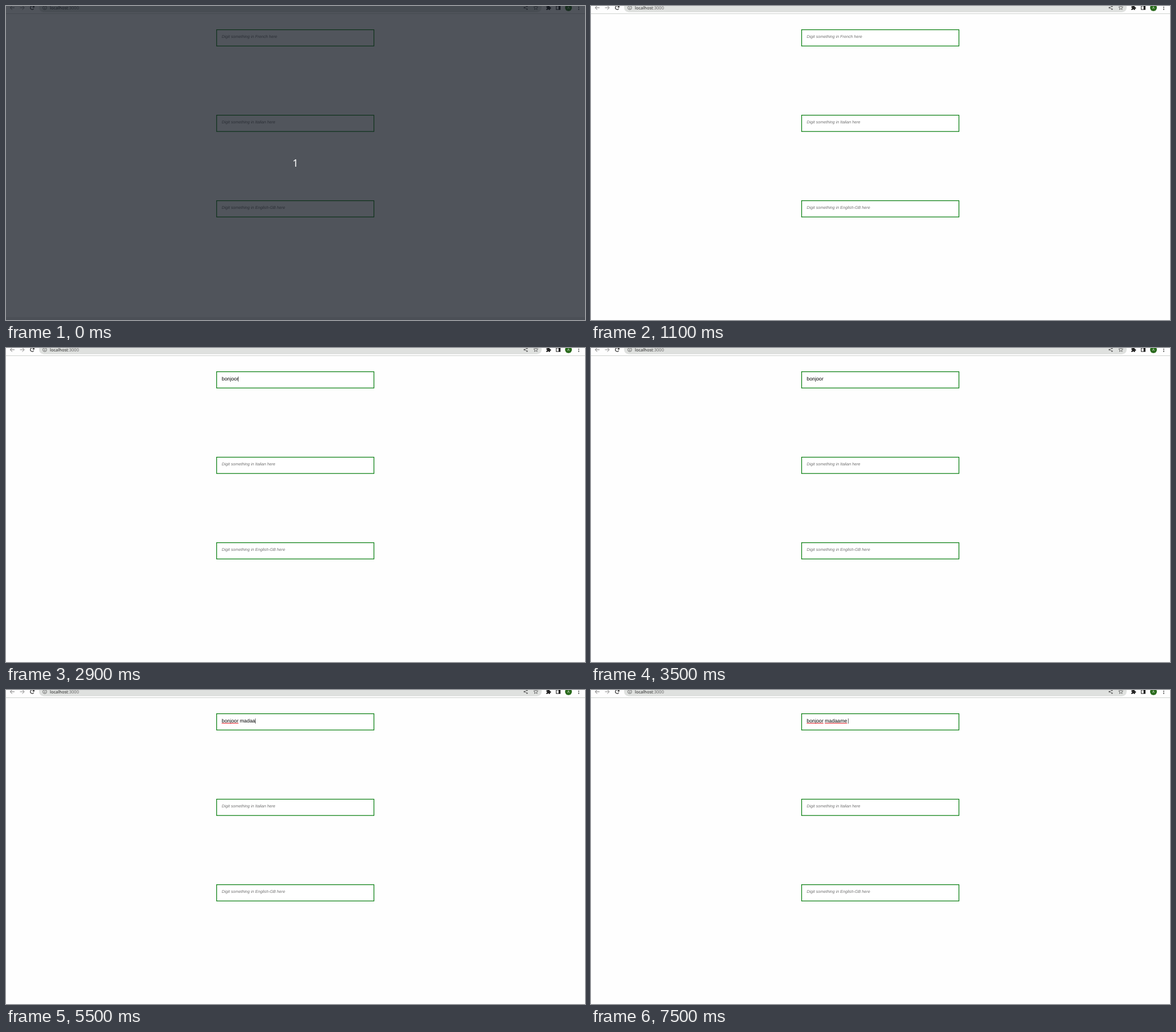
An HTML page with a canvas that plays this animation: 1016 by 551 pixels, repeating every 8000 ms.

```html
<!DOCTYPE html>
<html lang="en">
<head>
<meta charset="utf-8">
<title>Spell check demo</title>
<style>
  html, body { margin: 0; width: 100%; height: 100%; overflow: hidden; background: #fefefe; }
  canvas { display: block; width: 1016px; height: 551px; }
</style>
</head>
<body>
<canvas id="stage" width="1016" height="551"></canvas>
<script>
const ctx = document.getElementById('stage').getContext('2d');
const W = 1016, H = 551, LOOP = 8000, TAU = Math.PI * 2;
const SANS = '"Liberation Sans", Arial, sans-serif';
const UI = '"Noto Sans", "Open Sans", sans-serif';
const INPUT_FONT = '8.8px ' + SANS;
const HINT_FONT = 'italic 7.15px ' + SANS;
const TEXT_X = 378.5;

const PHRASE = 'bonjoor madaame ';
// time of each keystroke in ms
const KEYS = [1500, 1600, 1900, 2000, 2500, 2700, 2900, 3900,
              4300, 4400, 4800, 5100, 5500, 5900, 6100, 6300];
const FOCUS = 500, BLINK = 600, CHECK_DELAY = 500;

function text(str, x, y, font, color, align = 'left') {
  ctx.font = font;
  ctx.fillStyle = color;
  ctx.textAlign = align;
  ctx.fillText(str, x, y);
}

function line(points, color, width = 1) {
  ctx.beginPath();
  points.forEach(([x, y]) => ctx.lineTo(x, y));
  ctx.strokeStyle = color;
  ctx.lineWidth = width;
  ctx.stroke();
}

function disc(x, y, r, color) {
  ctx.beginPath();
  ctx.arc(x, y, r, 0, TAU);
  ctx.fillStyle = color;
  ctx.fill();
}

function rect(x, y, w, h, color) {
  ctx.fillStyle = color;
  ctx.fillRect(x, y, w, h);
}

function arrow(x, dir, color) {
  line([[x - 4 * dir, 3], [x + 3.6 * dir, 3]], color);
  line([[x, -0.6], [x + 3.7 * dir, 3], [x, 6.6]], color);
}

function reload(x, y) {
  ctx.beginPath();
  ctx.arc(x, y, 3.2, 0.5, TAU - 0.75);
  ctx.strokeStyle = '#333';
  ctx.lineWidth = 1.2;
  ctx.stroke();
  ctx.beginPath();
  ctx.moveTo(x + 3.9, y - 4);
  ctx.lineTo(x + 3.9, y - 0.3);
  ctx.lineTo(x + 0.3, y - 0.3);
  ctx.fillStyle = '#333';
  ctx.fill();
}

function info(x, y) {
  ctx.beginPath();
  ctx.arc(x, y, 3.4, 0, TAU);
  ctx.strokeStyle = '#555';
  ctx.lineWidth = 0.8;
  ctx.stroke();
  rect(x - 0.45, y - 0.4, 0.9, 2.4, '#444');
  rect(x - 0.45, y - 2, 0.9, 0.9, '#444');
}

function share(x, y) {
  line([[x + 2.3, y - 2.6], [x - 2.4, y], [x + 2.3, y + 2.6]], '#555', 0.8);
  [[2.3, -2.6], [-2.4, 0], [2.3, 2.6]].forEach(([dx, dy]) => disc(x + dx, y + dy, 1.2, '#555'));
}

function star(x, y) {
  ctx.beginPath();
  for (let i = 0; i < 10; i++) {
    const r = i % 2 ? 1.8 : 4, a = i * TAU / 10 - TAU / 4;
    ctx.lineTo(x + r * Math.cos(a), y + r * Math.sin(a));
  }
  ctx.closePath();
  ctx.strokeStyle = '#555';
  ctx.lineWidth = 0.8;
  ctx.stroke();
}

function puzzle(x, y) {
  rect(x - 3.8, y - 2.4, 6.4, 6.4, '#222');
  disc(x - 0.5, y - 2.8, 1.4, '#222');
  disc(x + 3, y + 0.6, 1.4, '#222');
  disc(x - 3.6, y + 0.8, 1.1, '#fefefe');
  disc(x - 0.5, y + 3.9, 1.1, '#fefefe');
}

function panel(x, y) {
  ctx.strokeStyle = '#222';
  ctx.lineWidth = 1;
  ctx.strokeRect(x - 3.5, y - 3, 7, 6.2);
  rect(x + 0.6, y - 3, 3, 6.2, '#222');
}

function toolbar() {
  ctx.beginPath();
  ctx.roundRect(58, -6, 882, 17, 8.5);
  ctx.fillStyle = '#dfe1df';
  ctx.fill();
  rect(0, 13, W, 1, '#d0d2d0');

  arrow(11, -1, '#777');
  arrow(28.5, 1, '#888');
  reload(46, 3);
  info(68, 3);

  const font = '7.52px ' + UI, host = 'localhost';
  text(host, 77, 6, font, '#222');
  text(':3000', 77 + ctx.measureText(host).width, 6, font, '#666');

  share(912, 3);
  star(929.7, 3);
  puzzle(952, 3);
  panel(969, 3);
  disc(987, 3, 6, '#2b6b1e');
  text('A', 987, 5, '6px ' + UI, '#e8f0e6', 'center');
  [-0.2, 2.9, 6].forEach(y => disc(1005, y, 0.9, '#333'));
}

function field(y, hint) {
  rect(369, y, 277, 29.6, '#fff');
  ctx.strokeStyle = '#0a7f12';
  ctx.lineWidth = 1.25;
  ctx.strokeRect(369.6, y + 0.6, 276, 28.6);
  if (hint) text(`Digit something in ${hint} here`, TEXT_X, y + 15, HINT_FONT, '#707070');
}

function squiggle(from, to) {
  rect(from, 58, to - from, 1, 'rgba(226,28,36,0.85)');
  rect(from, 57, to - from, 1, 'rgba(226,28,36,0.15)');
}

function typing(t) {
  const count = KEYS.filter(k => k <= t).length;
  const typed = PHRASE.slice(0, count);
  text(typed, TEXT_X, 57, INPUT_FONT, '#000');
  const xAt = n => TEXT_X + ctx.measureText(PHRASE.slice(0, n)).width;

  // a finished word is checked shortly after the space that follows it
  let start = 0;
  for (let i = 0; i < PHRASE.length; i++) {
    if (PHRASE[i] !== ' ') continue;
    if (t >= KEYS[i] + CHECK_DELAY) squiggle(xAt(start), xAt(i));
    start = i + 1;
  }

  if (t < FOCUS) return;
  const since = t - (count ? KEYS[count - 1] : FOCUS);
  if (Math.floor(since / BLINK) % 2 === 0) {
    rect(Math.floor(xAt(count)), 50, 1, 9, 'rgba(0,0,0,0.6)');
  }
}

function countdown() {
  rect(0, 0, W, H, 'rgba(17,22,32,0.73)');
  rect(0, 546, W, 5, 'rgba(40,44,52,0.12)');
  text('1', 507.8, 282, '500 18px ' + UI, '#fff', 'center');
}

function draw(t) {
  ctx.textRendering = 'geometricPrecision';
  rect(0, 0, W, H, '#fefefe');
  toolbar();
  field(41, t < KEYS[0] ? 'French' : '');
  field(191, 'Italian');
  field(341, 'English-GB');
  typing(t);
  if (t < 100) countdown();
}

const begin = performance.now();
function tick() {
  draw((performance.now() - begin) % LOOP);
  requestAnimationFrame(tick);
}
tick();
</script>
</body>
</html>
```
